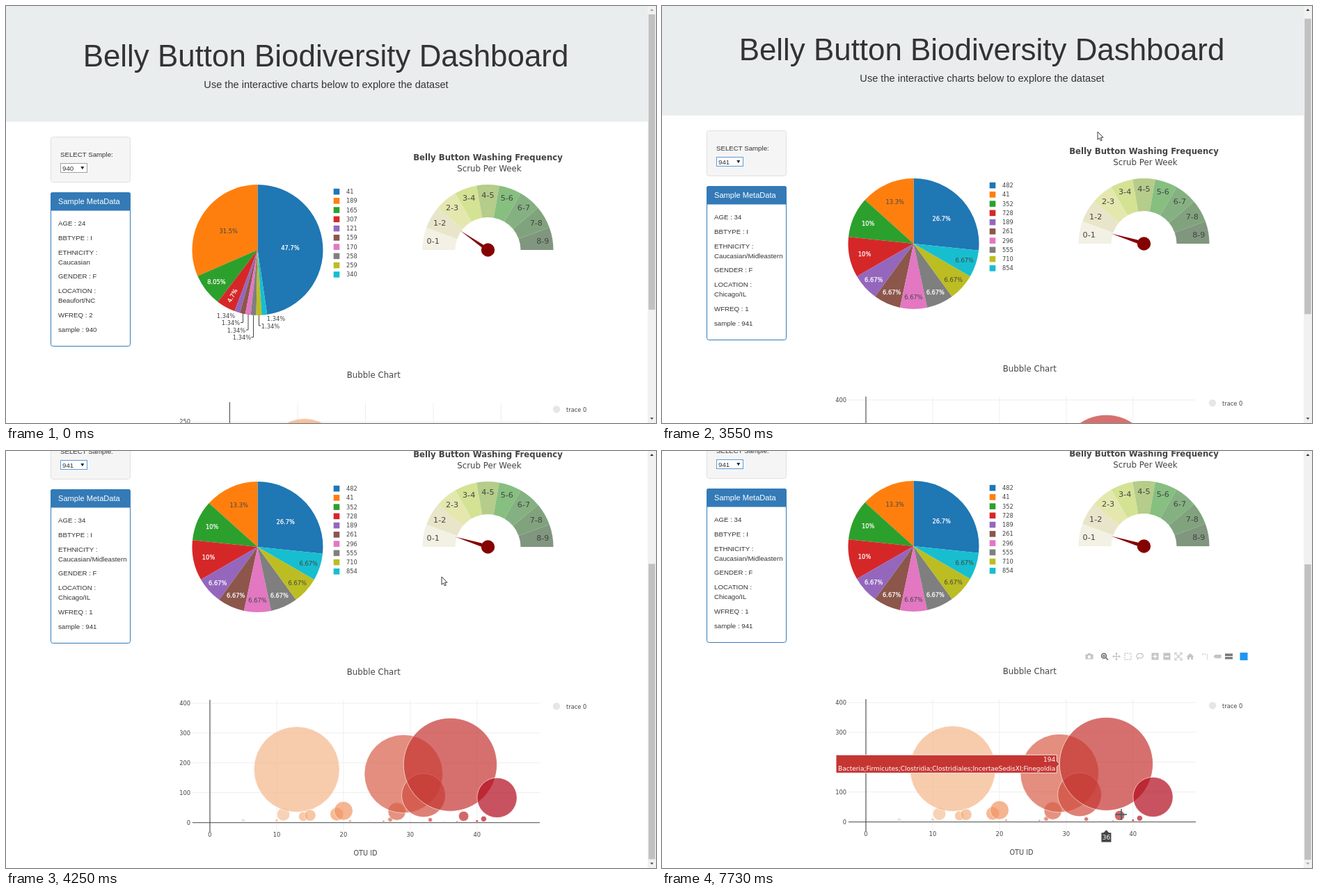
An HTML page that plays this animation: 934x600 px, repeating every 8 s.

```html
<!DOCTYPE html>
<html lang="en">
<head>
<meta charset="utf-8">
<title>Biodiversity Dashboard</title>
<style>
html, body { margin: 0; width: 100%; height: 100%; overflow: hidden; background: #fff; }
svg { display: block; width: 934px; height: 600px; font-family: "Liberation Sans", Arial, sans-serif; }
.plot { font-family: "DejaVu Sans", Verdana, sans-serif; }
</style>
</head>
<body>
<svg id="stage" viewBox="0 0 934 600"></svg>
<script>
const NS = 'http://www.w3.org/2000/svg';
const STEP = 77.55, START = 505, LOOP = 8000;
const PALETTE = ['#1f77b4', '#ff7f0e', '#2ca02c', '#d62728', '#9467bd',
  '#8c564b', '#e377c2', '#7f7f7f', '#bcbd22', '#17becf'];
const DARK = '#444';
const stage = document.getElementById('stage');

function el(tag, attrs, parent) {
  const n = document.createElementNS(NS, tag);
  for (const a in attrs) n.setAttribute(a, attrs[a]);
  parent.appendChild(n);
  return n;
}
const group = (p, attrs = {}) => el('g', attrs, p);
const rect = (p, x, y, w, h, fill, more) => el('rect', { x, y, width: w, height: h, fill, ...more }, p);
const path = (p, d, fill, more) => el('path', { d, fill, ...more }, p);
const line = (p, d, stroke, w = 1) => path(p, d, 'none', { stroke, 'stroke-width': w });
const circle = (p, cx, cy, r, fill, more) => el('circle', { cx, cy, r, fill, ...more }, p);
function text(p, x, y, str, size, fill = '#333', anchor = 'start', more = {}) {
  const n = el('text', { x, y, 'font-size': size, fill, 'text-anchor': anchor, ...more }, p);
  n.textContent = str;
  return n;
}
const show = (n, on) => n.setAttribute('display', on ? 'inline' : 'none');
const move = (n, x, y) => n.setAttribute('transform', `translate(${x} ${y})`);

// Linear interpolation through rows of [step, value, value, ...]
function track(rows, k) {
  if (k <= rows[0][0]) return rows[0].slice(1);
  for (let i = 1; i < rows.length; i++) {
    const a = rows[i - 1], b = rows[i];
    if (k <= b[0]) {
      const u = (k - a[0]) / (b[0] - a[0]);
      return a.slice(1).map((v, j) => v + (b[j + 1] - v) * u);
    }
  }
  return rows[rows.length - 1].slice(1);
}

// ---- page, header, side panels
rect(stage, 0, 0, 934, 600, '#fff');
const page = group(stage);
rect(page, 0, 0, 922, 166.5, '#eaeded');
text(page, 459.5, 87, 'Belly Button Biodiversity Dashboard', 43.9, '#333', 'middle');
text(page, 460, 117.5, 'Use the interactive charts below to explore the dataset', 14.6, '#333', 'middle');

rect(page, 64.5, 188.5, 114, 65, '#f5f5f5', { rx: 3, stroke: '#e0e0e0' });
text(page, 78, 217, 'SELECT Sample:', 9.7);
const select = rect(page, 78.5, 226.5, 38, 13, '#fff', { stroke: '#a0a0a0' });
const chosen = text(page, 81, 236.7, '940', 9.7);
path(page, 'M107.3 231h5l-2.5 4.2z', '#222');

rect(page, 64.5, 268.5, 114, 221, '#fff', { rx: 3, stroke: '#337ab7' });
path(page, 'M64 294.5V271q0-3 3-3h109q3 0 3 3v23.5z', '#337ab7');
text(page, 75, 285, 'Sample MetaData', 11.1, '#fff');

function metadata(rows) {
  const g = group(page), ys = [315.7, 336.6, 357.6, 371.5, 392.2, 413.1, 427, 447.8, 468.6];
  rows.forEach((s, i) => text(g, 75, ys[i], s, 9.7));
  return g;
}
const metaA = metadata(['AGE : 24', 'BBTYPE : I', 'ETHNICITY :', 'Caucasian', 'GENDER : F',
  'LOCATION :', 'Beaufort/NC', 'WFREQ : 2', 'sample : 940']);
const metaB = metadata(['AGE : 34', 'BBTYPE : I', 'ETHNICITY :', 'Caucasian/Midleastern', 'GENDER : F',
  'LOCATION :', 'Chicago/IL', 'WFREQ : 1', 'sample : 941']);

// ---- pie
const plots = group(page, { class: 'plot' });
const polar = (cx, cy, r, a) => [cx + r * Math.sin(a), cy - r * Math.cos(a)];

function pie(counts, ids, radii) {
  const g = group(plots), cx = 361.5, cy = 351, R = 94;
  const total = counts.reduce((a, b) => a + b);
  let a = 2 * Math.PI * counts[0] / total;
  counts.forEach((n, i) => {
    const w = 2 * Math.PI * n / total, b = a - w, mid = (a + b) / 2;
    const [x0, y0] = polar(cx, cy, R, a), [x1, y1] = polar(cx, cy, R, b);
    path(g, `M${cx} ${cy}L${x0} ${y0}A${R} ${R} 0 0 0 ${x1} ${y1}Z`, PALETTE[i]);
    a = b;
    if (radii[i]) {
      const [x, y] = polar(cx, cy, radii[i], mid);
      const fill = [1, 6, 8, 9].includes(i) ? DARK : '#fff';
      const tilt = n / total < 0.05 ? -61 : 0;
      text(g, x, y + 3, +(100 * n / total).toPrecision(3) + '%', 8.3, fill, 'middle',
        { transform: `rotate(${tilt} ${x} ${y})`, stroke: fill, 'stroke-width': fill === '#fff' ? 0.25 : 0 });
    }
    rect(g, 470.7, 262.8 + 13.25 * i, 8.6, 8.6, PALETTE[i]);
    text(g, 489, 270.2 + 13.25 * i, ids[i], 8.3, DARK);
  });
  return g;
}
const pieA = pie([71, 47, 12, 7, 2, 2, 2, 2, 2, 2],
  [41, 189, 165, 307, 121, 159, 170, 258, 259, 340], [47, 50, 75, 75]);
[[316, 446], [323, 456], [331, 466.5], [339, 477], [380, 460.5], [388, 450]]
  .forEach(([x, y]) => text(pieA, x, y + 3, '1.34%', 8.3, DARK, 'middle'));
line(pieA, 'M340.5 441V455.5H337M348 443.5V466H345M355.5 445V476.5H352.5M363.5 445V460H366', DARK);
const pieB = pie([8, 4, 3, 3, 2, 2, 2, 2, 2, 2],
  [482, 41, 352, 728, 189, 261, 296, 555, 710, 854], [54, 66, 71.5, 72, 77, 77, 77, 77, 77, 77]);

// ---- gauge
const gauge = group(plots), GX = 692.5, GY = 351;
text(gauge, GX, 222.3, 'Belly Button Washing Frequency', 11.72, DARK, 'middle', { 'font-weight': 'bold' });
text(gauge, 694.5, 237.8, 'Scrub Per Week', 11.8, DARK, 'middle');
['#f3f0e4', '#e8e5ca', '#e4e8af', '#d4e294', '#b5cc8a', '#86bf80', '#85b182', '#80a37d', '#81967e']
  .forEach((fill, i) => {
    const a = (i * 20 - 90) * Math.PI / 180, b = a + Math.PI / 9;
    const pt = (r, q) => polar(GX, GY, r, q).join(' ');
    path(gauge, `M${pt(47, a)}L${pt(94, a)}A94 94 0 0 1 ${pt(94, b)}L${pt(47, b)}A47 47 0 0 0 ${pt(47, a)}Z`, fill);
    const [x, y] = polar(GX, GY, 80, (a + b) / 2);
    text(gauge, x, y + 4.6, `${i}-${i + 1}`, 11.2, DARK, 'middle');
  });
const needle = path(gauge, '', '#850000');
circle(gauge, GX, GY, 9.7, '#850000');

// ---- bubble chart
const bubbles = group(plots);
text(bubbles, 528.3, 535.3, 'Bubble Chart', 11.75, DARK, 'middle');
circle(bubbles, 791, 580.3, 5.2, '#e6e6e6');
text(bubbles, 805, 583.5, 'trace 0', 8.3, DARK);

function heat(f) {
  const stops = [[0, 220, 220, 220], [0.2, 245, 195, 157], [0.4, 245, 160, 105], [1, 178, 10, 28]];
  return `rgb(${track(stops, f).map(Math.round)})`;
}
const dot = (p, x, y, v, f) => circle(p, x, y, v * 0.346, heat(f),
  { opacity: 0.7, stroke: '#fff', 'stroke-width': v > 6 ? 0.8 : 0.3 });

const chartA = group(bubbles);
line(chartA, 'M419 571V620M516.5 571V620M614 571V620M711.5 571V620M268 598.5H767', '#eee');
line(chartA, 'M321.5 570V620', DARK);
text(chartA, 265, 601, '250', 8.3, DARK, 'end');
dot(chartA, 429, 650, 163, 0.34);

const chartB = group(bubbles);
const bx = v => 293 + v * 9.595, by = v => 747.5 - v * 0.429;
for (let i = 0; i < 5; i++) {
  const x = bx(i * 10), y = by(i * 100);
  if (i) line(chartB, `M${x} 571V761M268 ${y}H767`, '#eee');
  text(chartB, x, 767.5, i * 10, 8.3, DARK, 'middle');
  text(chartB, 265, y + 3, i * 100, 8.3, DARK, 'end');
}
line(chartB, 'M293 571V761M268 747.7H767', DARK, 1.1);
text(chartB, 516.5, 794.5, 'OTU ID', 9.7, DARK, 'middle');
const POINTS = [[5, 7], [10, 7], [11, 27], [13, 178], [14, 20], [15, 24], [19, 28], [20, 39], [21, 5],
  [22, 2], [24, 2], [26, 4], [27, 10], [28, 37], [29, 163], [30, 2], [32, 91], [33, 9], [35, 2],
  [36, 194], [37, 3], [38, 21], [40, 5], [41, 12], [43, 83]];
const shade = x => (x - 2) / 41;
POINTS.forEach(([x, v]) => dot(chartB, bx(x), by(v), v, shade(x)));

// ---- hover labels
function hoverLabel(x, v, taxon) {
  const g = group(chartB), y = by(v), right = bx(x) - v * 0.346 - 4, fill = heat(shade(x));
  const box = path(g, '', fill, { stroke: '#fff', 'stroke-width': 0.8 });
  text(g, right - 2, y - 3, v, 9, '#fff', 'end');
  const t = text(g, right - 2, y + 9.3, taxon, 9, '#fff', 'end');
  const left = right - t.getComputedTextLength() - 5;
  box.setAttribute('d', `M${left} ${y - 13}H${right}V${y - 4}l4 4l-4 4V${y + 13}H${left}Z`);
  const cx = bx(x);
  path(g, `M${cx} 759l4 4h3.3v14h-14.6v-14h3.3z`, DARK, { stroke: '#fff', 'stroke-width': 0.6 });
  text(g, cx, 773.2, x, 9, '#fff', 'middle');
  return g;
}
const FIRM = 'Bacteria;Firmicutes;Clostridia;Clostridiales;IncertaeSedisXI;';
const CAMP = 'Bacteria;Proteobacteria;Epsilonproteobacteria;Campylobacterales;Campylobacteraceae;Campylobacter';
const label36 = hoverLabel(36, 194, FIRM + 'Finegoldia');
const label38 = hoverLabel(38, 21, FIRM + 'Peptoniphilus');
const label43 = hoverLabel(43, 83, CAMP);

// ---- mode bars
const ICONS = {
  camera: ['M-5.5-3h3l1-1.5h3l1 1.5h3v7h-11zM0-1.6a2.3 2.3 0 1 0 .01 0z', 1],
  zoom: ['M-1-4.2a3.4 3.4 0 1 0 .01 0zM1.6 1.8L5 5M-2.6-.8h3.2M-1-2.4v3.2', 0],
  pan: ['M-5 0H5M0-5V5M-1.4-3.6L0-5l1.4 1.4M-1.4 3.6L0 5l1.4-1.4M-3.6-1.4L-5 0l1.4 1.4M3.6-1.4L5 0 3.6 1.4', 0],
  box: ['M-4.5-4.5h9v9h-9z', 0],
  lasso: ['M-3 2.5C-7-1-3-4.5 1-4.3S6.500 1 2 2.200C-1 3-3 1-3 2.500S-2 4-3.200 5', 0],
  plus: ['M-5-5h10v10h-10zM-.8-3v2.200h-2.200v1.600h2.200v2.200h1.600v-2.200h2.200v-1.600h-2.200v-2.200z', 1],
  minus: ['M-5-5h10v10h-10zM-3-.8v1.600h6v-1.600z', 1],
  fit: ['M-5-2v-3h3M2-5h3v3M5 2v3h-3M-2 5h-3v-3M-3.500-3.500l7 7M3.500-3.500l-7 7', 0],
  home: ['M-5.500.500L0-4.500 5.500.500H4V4.500H1.200V1.500H-1.200V4.500H-4V.500z', 1],
  spike: ['M-4-3.500h6M3.500-3v7.500', 0],
  tag: ['M-5.500 0l2.500-2.700h8.500v5.400h-8.500z', 1],
  compare: ['M-5.500-4h11v3.300h-11zM-5.500.700h11v3.300h-11z', 1]
};
function modebar(y, items, logoX) {
  const g = group(plots);
  for (const [name, x] of items) {
    const [d, solid] = ICONS[name];
    const color = name === 'zoom' || name === 'compare' ? '#777' : '#c4c4c4';
    const n = path(g, d, solid ? color : 'none', { 'fill-rule': 'evenodd' });
    if (!solid) {
      n.setAttribute('stroke', color);
      n.setAttribute('stroke-width', name === 'zoom' ? 1.7 : 1.2);
      if (name === 'box' || name === 'spike') n.setAttribute('stroke-dasharray', '2 1.2');
    }
    move(n, x, y);
  }
  rect(g, logoX - 5.5, y - 5.5, 11, 11, '#1e96f3');
  return g;
}
const xs = [614, 636, 653, 669.5, 686.5, 708.5, 725.5, 742, 759, 780, 798, 814.5];
const bars = [
  { g: modebar(197, [['camera', 505]], 527), box: [231, 188, 540, 497] },
  { g: modebar(197, [['camera', 798], ['tag', 814.5]], 836), box: [540, 188, 848, 497] },
  { g: modebar(509.6, Object.keys(ICONS).map((n, i) => [n, xs[i]]), 836), box: [231, 497, 848, 814] }
];

// ---- dropdown list
const list = group(stage);
rect(list, 78.5, 239.5, 38, 249, '#fff', { stroke: '#8fa9c8' });
const marker = rect(list, 79, 240, 25.5, 12.4, '#1e90ff');
const options = [];
for (let id = 940; id <= 962; id++) {
  if ([942, 951, 957].includes(id)) continue;
  options.push(text(list, 81, 249.6 + options.length * 12.37, id, 9.7));
}
rect(list, 104.5, 240, 11.5, 248, '#f1f1f1');
rect(list, 105.5, 253, 9.5, 28, '#c1c1c1');
path(list, 'M107.800 247.500h5l-2.500-2.800z', '#a3a3a3');
path(list, 'M107.800 480.300h5l-2.500 2.800z', '#505050');

// ---- page scrollbar
rect(stage, 922, 0, 12, 600, '#f1f1f1');
const thumb = rect(stage, 923.3, 12, 9.4, 425, '#c1c1c1');
const up = path(stage, 'M925.500 7h5l-2.500-3z', '#a3a3a3');
const down = path(stage, 'M925.500 592.200h5l-2.500 3z', '#505050');

// ---- mouse
const arrow = path(stage, 'M0 0V11.300L2.600 8.900 4.400 12.900 6.200 12.100 4.500 8.200H8Z', '#fff',
  { stroke: '#222', 'stroke-width': 0.9 });
const cross = group(stage);
line(cross, 'M-8 0H8M0-8V8', '#2f5c62', 1.4);

const MOUSE = [[0, 470, 588], [2, 400, 470], [5, 250, 330], [8, 112, 234], [9, 110, 232],
  [11, 110, 232], [17, 90, 260], [29, 90, 260], [30, 120, 255], [32, 370, 215], [34, 610, 190],
  [35, 626, 183], [36, 626, 181], [49, 626, 181], [53, 628, 177], [54, 628, 177], [55, 632, 200],
  [57, 646, 330], [59, 652, 420], [61, 651, 437], [70, 651, 437], [71, 653, 436], [72, 653, 436],
  [79, 715, 498], [88, 715, 498], [91, 660, 521], [92, 660, 521], [93, 660, 523]];
const SCROLL = [[38, 0], [39, 9], [44, 138], [46, 186], [48, 213], [49, 214]];

function hovered(box, k) {
  if (k < 0 || (k > 37 && k < 55)) return 0;
  const [x, my] = track(MOUSE, k), y = my + (k < 55 ? 0 : 214);
  return +(x >= box[0] && x < box[2] && y >= box[1] && y < box[3]);
}

function render(t) {
  const k = Math.floor((t - START) / STEP);
  const [scroll] = track(SCROLL, k);
  const [mx, my] = track(MOUSE, k);

  move(page, 0, -scroll);
  thumb.setAttribute('y', 12 + scroll * 0.706);
  up.setAttribute('fill', scroll > 0 ? '#303030' : '#a3a3a3');
  down.setAttribute('fill', scroll < 214 ? '#505050' : '#a3a3a3');

  chosen.textContent = k < 19 ? '940' : '941';
  select.setAttribute('stroke', k < 9 ? '#a0a0a0' : '#5b9bd8');
  const open = k >= 10 && k < 19, pick = my > 252.4 ? 1 : 0;
  show(list, open);
  marker.setAttribute('y', 240 + pick * 12.37);
  options.forEach((o, i) => o.setAttribute('fill', i === pick ? '#fff' : '#333'));

  const fresh = k >= 22, redrawn = k >= 26;
  show(metaA, !fresh);
  show(metaB, fresh);
  const [nx, ny] = fresh ? [-46.700, -14.600] : [-39.700, -27.800];
  needle.setAttribute('d', `M${GX} ${GY - 3.200}V${GY + 3.200}L${GX + nx} ${GY + ny}Z`);
  show(pieA, !redrawn);
  show(pieB, redrawn);
  show(chartA, !redrawn);
  show(chartB, redrawn);

  show(label36, (k >= 59 && k < 75) || k >= 91);
  show(label43, k >= 75 && k < 90);
  show(label38, k === 90);

  for (const { g, box } of bars) {
    g.setAttribute('opacity', (hovered(box, k) + hovered(box, k - 1) + hovered(box, k - 2)) / 3);
  }

  const inPlot = (k < 30 || k >= 55) && mx > 268 && mx < 767 && my + scroll > 571;
  show(arrow, k >= 0 && !inPlot);
  show(cross, k >= 0 && inPlot);
  move(arrow, mx, my);
  move(cross, mx, my);
}

const t0 = performance.now();
function loop() {
  render((performance.now() - t0) % LOOP);
  requestAnimationFrame(loop);
}
loop();
</script>
</body>
</html>
```
